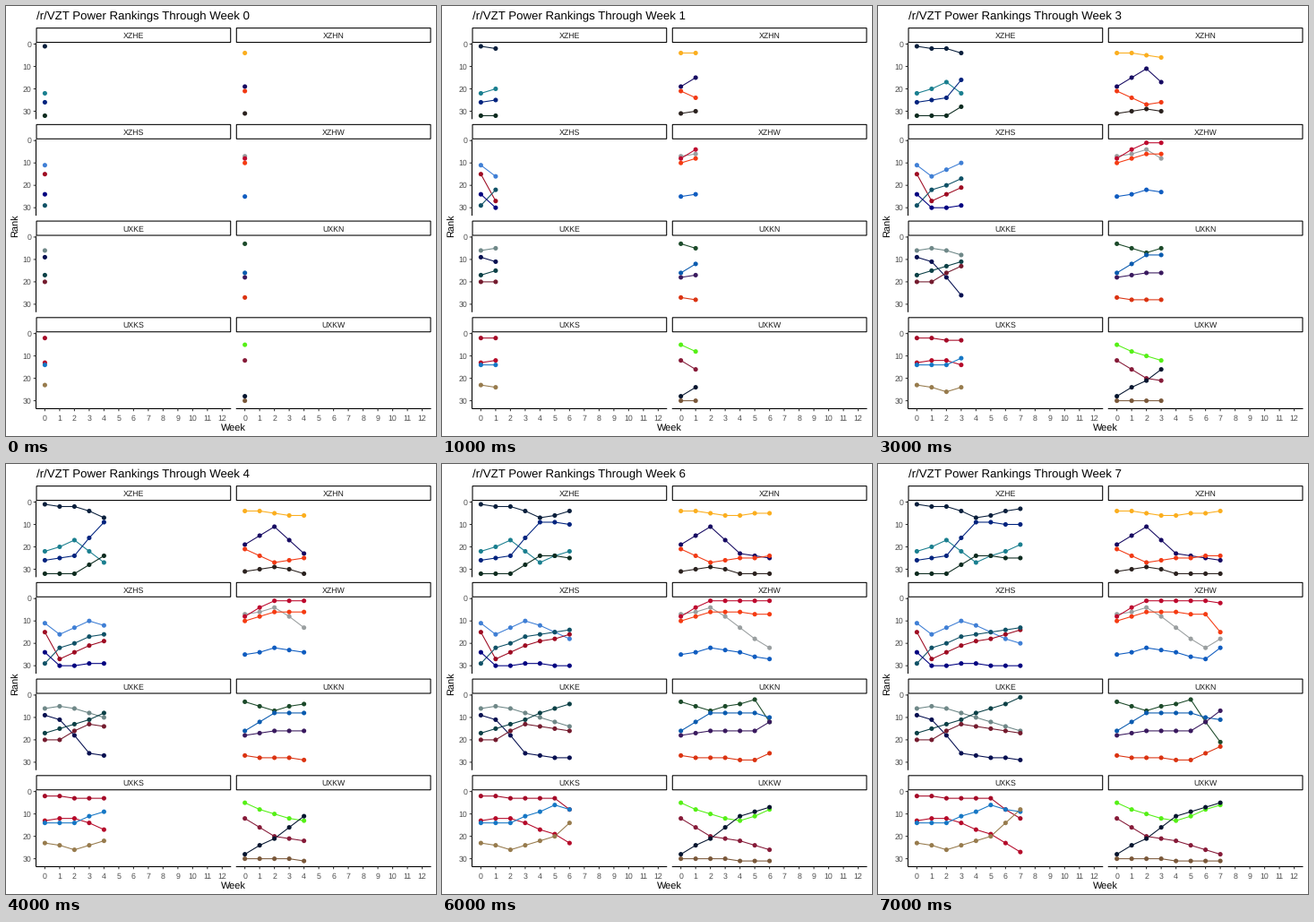
A matplotlib script that plays this animation: 480 px wide and 480 px high, repeating every 8000 ms.

```python
import numpy as np
import matplotlib.pyplot as plt
from matplotlib.animation import FuncAnimation
from matplotlib.patches import Rectangle

plt.rcParams["font.family"] = "Liberation Sans"
plt.rcParams["text.hinting"] = "none"

SIZE, DPI = 480, 72          # at 72 dpi one point is one pixel
LEFT, TOP, BOTTOM = 33.5, 24.1, 449.5
PANEL_W, STRIP_H, GAP = 217.75, 17, 5.5
PANEL_H = (BOTTOM - TOP - 3 * GAP) / 4 - STRIP_H
TICK, LINE_W, DOT = 2.75, 1.07, 5.1
WEEKS = np.arange(8)

fig = plt.figure(figsize=(SIZE / DPI, SIZE / DPI), dpi=DPI, facecolor="white")
ax = fig.add_axes([0, 0, 1, 1])
ax.set(xlim=(0, SIZE), ylim=(SIZE, 0), autoscale_on=False)
ax.axis("off")

series = []


def panel_left(col):
    return LEFT + col * (PANEL_W + GAP)


def strip_top(row):
    return TOP + row * (STRIP_H + PANEL_H + GAP)


def week_x(col, week):
    return panel_left(col) + (week + 0.6) * PANEL_W / 13.2


def rank_y(row, rank):
    return strip_top(row) + STRIP_H + (rank + 0.55) * PANEL_H / 34.1


def segment(x0, y0, x1, y1, color="black"):
    ax.plot([x0, x1], [y0, y1], color=color, lw=LINE_W,
            solid_capstyle="butt", snap=False)


def label(x, y, text, size, color="black", ha="center", **kw):
    return ax.text(x, y, text, fontsize=size, color=color, ha=ha,
                   va="baseline", **kw)


def add_panel(row, col, name, keys=(0, 2, 4, 7)):
    """Draw the strip; return a function that adds a team by its key ranks."""
    x, y = panel_left(col), strip_top(row)
    inset = LINE_W / 2
    ax.add_patch(Rectangle((x + inset, y + inset), PANEL_W - LINE_W,
                           STRIP_H - LINE_W, fill=False, ec="black",
                           lw=LINE_W, snap=False))
    label(x + PANEL_W / 2, y + 12.1, name, 8.8, "#1a1a1a")

    def team(color, *ranks):
        # ranks drift evenly between the key weeks
        path = np.round(np.interp(WEEKS, keys, ranks))
        points = np.column_stack([week_x(col, WEEKS), rank_y(row, path)])
        line, = ax.plot([], [], color=color, lw=LINE_W, zorder=3,
                        solid_capstyle="butt", snap=False)
        dots = ax.scatter([], [], s=DOT ** 2, color=color,
                          edgecolors="none", zorder=4)
        series.append((line, dots, points))

    return team


def add_axes():
    for row in range(4):
        top = strip_top(row) + STRIP_H
        segment(LEFT, top, LEFT, top + PANEL_H)
        for rank in range(0, 40, 10):
            y = rank_y(row, rank)
            segment(LEFT - TICK, y, LEFT, y, "#333333")
            label(LEFT - TICK - 2.2, y + 3.1, str(rank), 8.8, "#4d4d4d", "right")
    for col in range(2):
        left = panel_left(col)
        segment(left, BOTTOM, left + PANEL_W, BOTTOM)
        for week in range(13):
            x = week_x(col, week)
            segment(x, BOTTOM, x, BOTTOM + TICK, "#333333")
            label(x, 463, str(week), 8.8, "#4d4d4d")
    label(LEFT + PANEL_W + GAP / 2, 475, "Week", 11)
    label(13.5, (TOP + STRIP_H + BOTTOM) / 2, "Rank", 11,
          rotation=90, rotation_mode="anchor")


add_axes()
title = label(LEFT, 15, "", 13.2, ha="left")

team = add_panel(0, 0, "XZHE")
team("#0a1f3c", 1, 2, 7, 3)
team("#1a7f8f", 22, 17, 27, 19)
team("#00237e", 26, 24, 9, 10)
team("#0c2b1f", 32, 32, 24, 25)

team = add_panel(0, 1, "XZHN")
team("#fbae1e", 4, 5, 6, 4)
team("#160a62", 19, 11, 23, 26)
team("#f23a14", 21, 27, 25, 24)
team("#2a211e", 31, 29, 32, 32)

team = add_panel(1, 0, "XZHS", keys=(0, 1, 3, 7))
team("#3f7fd5", 11, 16, 10, 20)
team("#9e0b22", 15, 27, 21, 14)
team("#0f5166", 29, 22, 17, 13)
team("#000080", 24, 30, 29, 30)

team = add_panel(1, 1, "XZHW", keys=(0, 2, 6, 7))
team("#9a9fa0", 7, 4, 22, 18)
team("#be0a2e", 8, 1, 1, 2)
team("#f53b12", 10, 6, 7, 15)
team("#0f5cc0", 25, 22, 27, 22)

team = add_panel(2, 0, "UXKE", keys=(0, 1, 3, 7))
team("#6f8888", 6, 5, 8, 16)
team("#050f50", 9, 11, 26, 29)
team("#0b4046", 17, 15, 11, 1)
team("#741b2e", 20, 20, 13, 17)

team = add_panel(2, 1, "UXKN", keys=(0, 2, 5, 7))
team("#1c4a2a", 3, 7, 2, 21)
team("#0a5baf", 16, 8, 8, 11)
team("#3a1a5f", 18, 16, 16, 7)
team("#db3311", 27, 28, 29, 23)

team = add_panel(3, 0, "UXKS", keys=(0, 2, 5, 7))
team("#a50a28", 2, 3, 3, 12)
team("#b50a2a", 13, 12, 19, 27)
team("#1577c5", 14, 14, 6, 9)
team("#977b4d", 23, 26, 20, 8)

team = add_panel(3, 1, "UXKW")
team("#55f016", 5, 10, 13, 6)
team("#861a38", 12, 20, 22, 28)
team("#05152f", 28, 21, 11, 5)
team("#7a583a", 30, 30, 31, 31)


def update(week):
    title.set_text(f"/r/VZT Power Rankings Through Week {week}")
    for line, dots, points in series:
        shown = points[:week + 1]
        line.set_data(shown.T)
        dots.set_offsets(shown)
    return []


anim = FuncAnimation(fig, update, frames=len(WEEKS), interval=1000,
                     repeat=True, repeat_delay=0, blit=False)
plt.show()
```
